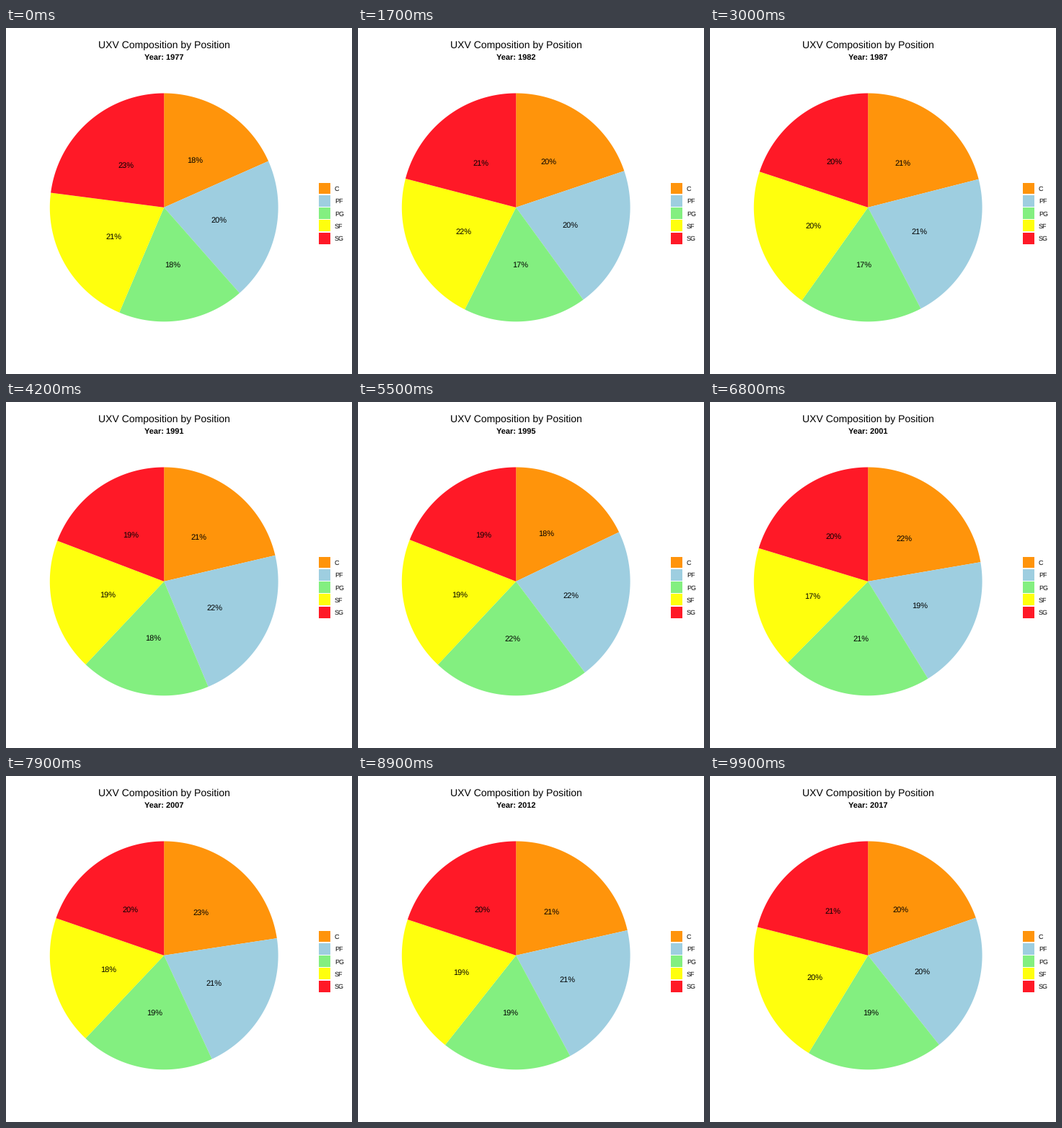
A matplotlib script for the animation above (10 s loop, 480x480 px).

```python
import numpy as np
import matplotlib.pyplot as plt
from matplotlib.animation import FuncAnimation
from matplotlib.patches import Polygon, Rectangle

plt.rcParams["font.family"] = "Liberation Sans"
plt.rcParams["text.hinting"] = "none"

SIZE, DPI = 480, 72
FRAMES, INTERVAL = 100, 100
FIRST_YEAR = 1977
CX, CY, R = 219.2, 248.9, 158.4

SLICES = {"C": "#ff940b", "PF": "#9ecee0", "PG": "#83ef80",
          "SF": "#ffff0d", "SG": "#ff1927"}

# Cumulative shares (percent) at the ends of the first four slices.
KEY_FRAMES = [0, 10, 35, 55, 68, 85, 99]
KEY_ENDS = np.array([
    [18.36, 38.5, 56.4, 77.05],
    [17.45, 36.1, 54.8, 78.25],
    [20.45, 41.7, 60.0, 80.3],
    [17.90, 39.7, 62.0, 80.95],
    [22.30, 41.2, 62.4, 79.7],
    [20.00, 40.0, 59.8, 80.2],
    [19.66, 39.3, 58.7, 79.0],
])
SWELL = np.array([2, 3, 1.5, 0.3])  # rise halfway between two keys


def elapsed_years(frame):
    """Three frames per year for the first 19 years, then two."""
    return frame / 3 if frame <= 57 else 19 + (frame - 57) / 2


def slice_bounds(frame):
    pos = np.interp(frame, KEY_FRAMES, range(len(KEY_FRAMES)))
    i = min(int(pos), len(KEY_FRAMES) - 2)
    u = pos - i
    ends = (1 - u) * KEY_ENDS[i] + u * KEY_ENDS[i + 1]
    return [0, *(ends + SWELL * np.sin(np.pi * u)), 100]


def on_circle(share, radius):
    """Point at a clockwise share (in percent) from the top."""
    angle = np.radians(np.asarray(share) * 3.6)
    return CX + radius * np.sin(angle), CY - radius * np.cos(angle)


def slice_points(start, end):
    x, y = on_circle(np.linspace(start, end, 80), R)
    return np.column_stack([np.append(x, CX), np.append(y, CY)])


fig = plt.figure(figsize=(SIZE / DPI, SIZE / DPI), dpi=DPI, facecolor="white")
ax = fig.add_axes([0, 0, 1, 1])
ax.set_xlim(0, SIZE)
ax.set_ylim(SIZE, 0)
ax.axis("off")

ax.text(219, 28, "UXV Composition by Position", size=14, ha="center")
year_text = ax.text(219, 44, "", size=11, weight="bold", ha="center")

wedges, labels = [], []
for i, (name, color) in enumerate(SLICES.items()):
    wedge = Polygon([(CX, CY)] * 3, facecolor=color, linewidth=0)
    wedges.append(ax.add_patch(wedge))
    labels.append(ax.text(CX, CY, "", size=11, ha="center", zorder=3))
    top = 214.6 + 17.28 * i
    ax.add_patch(Rectangle((434, top), 15.9, 15.85,
                           facecolor=color, linewidth=0))
    ax.text(455.8, top + 11.4, name, size=9)


def draw(frame):
    bounds = slice_bounds(frame)
    for wedge, label, start, end in zip(wedges, labels, bounds, bounds[1:]):
        wedge.set_xy(slice_points(start, end))
        x, y = on_circle((start + end) / 2, R / 2)
        label.set_position((x - 0.6, y + 4.4))
        label.set_text(f"{end - start:.0f}%")
    year_text.set_text(f"Year: {FIRST_YEAR + int(elapsed_years(frame))}")
    return [*wedges, *labels, year_text]


anim = FuncAnimation(fig, draw, frames=FRAMES, interval=INTERVAL,
                     repeat=True, repeat_delay=0)
plt.show()
```
